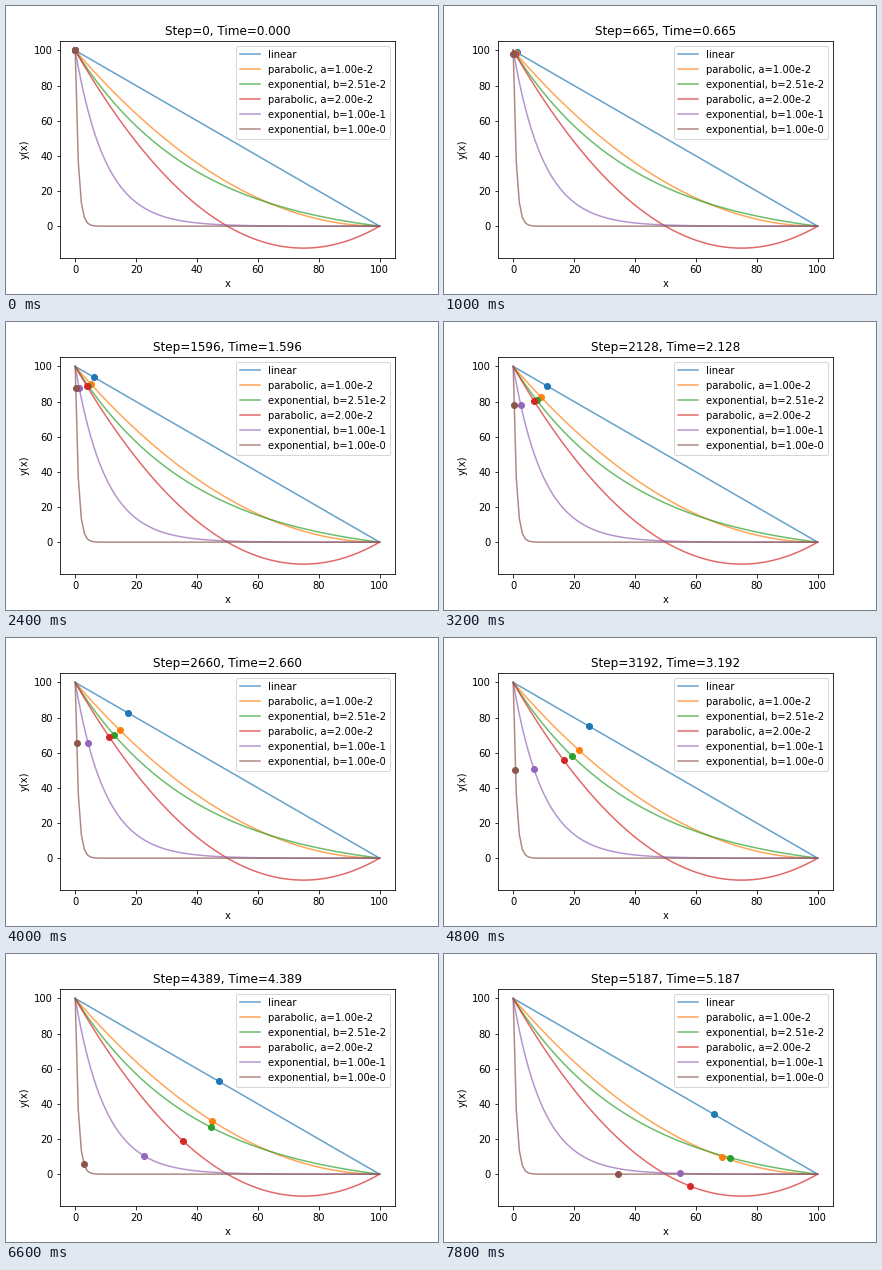
A matplotlib script for the animation above (8000 ms loop, 432 by 288 pixels).

```python
import numpy as np
import matplotlib.pyplot as plt
from matplotlib.animation import FuncAnimation

H = 100.0          # start height and horizontal distance
G = 9.8
STEP = 133         # simulation steps of 1 ms per frame
FRAMES = 40

plt.rcParams.update({"font.family": "DejaVu Sans", "font.size": 10})


def parabola(a):
    return lambda x: a * x**2 - (1 + H * a) * x + H


def exponential(b):
    end = np.exp(-b * H)
    return lambda x: H * (np.exp(-b * x) - end) / (1 - end)


def slide_times(curve):
    """Arrival time at each x for a bead sliding without friction."""
    x = H * np.linspace(0, 1, 20001) ** 2
    y = curve(x)
    v = np.sqrt(2 * G * np.maximum(H - y, 0))
    ds = np.hypot(np.diff(x), np.diff(y))
    dt = 2 * ds / (v[1:] + v[:-1])
    return np.concatenate(([0], np.cumsum(dt))), x


curves = [
    ("linear", parabola(0)),
    ("parabolic, a=1.00e-2", parabola(0.01)),
    ("exponential, b=2.51e-2", exponential(0.0251)),
    ("parabolic, a=2.00e-2", parabola(0.02)),
    ("exponential, b=1.00e-1", exponential(0.1)),
    ("exponential, b=1.00e-0", exponential(1)),
]

fig, ax = plt.subplots(figsize=(6, 4), dpi=72)
fig.subplots_adjust(left=0.125, right=0.9, bottom=0.125, top=0.88)

xs = np.linspace(0, H, 101)
for i, (label, curve) in enumerate(curves):
    ax.plot(xs, curve(xs), color=f"C{i}", alpha=0.7, label=label)

beads = [ax.plot([0], [H], "o", color=f"C{i}")[0] for i in range(len(curves))]
paths = [slide_times(curve) for _, curve in curves]

ax.set_xlabel("x")
ax.set_ylabel("y(x)")
ax.legend(loc="upper right")
title = ax.set_title("")


def update(frame):
    step = frame * STEP
    t = step / 1000
    title.set_text(f"Step={step}, Time={t:.3f}")
    for bead, (times, x), (_, curve) in zip(beads, paths, curves):
        pos = np.interp(t, times, x)
        bead.set_data([pos], [curve(pos)])
    return [title, *beads]


anim = FuncAnimation(fig, update, frames=FRAMES, interval=200,
                     repeat=True, repeat_delay=0, blit=False)
plt.show()
```
